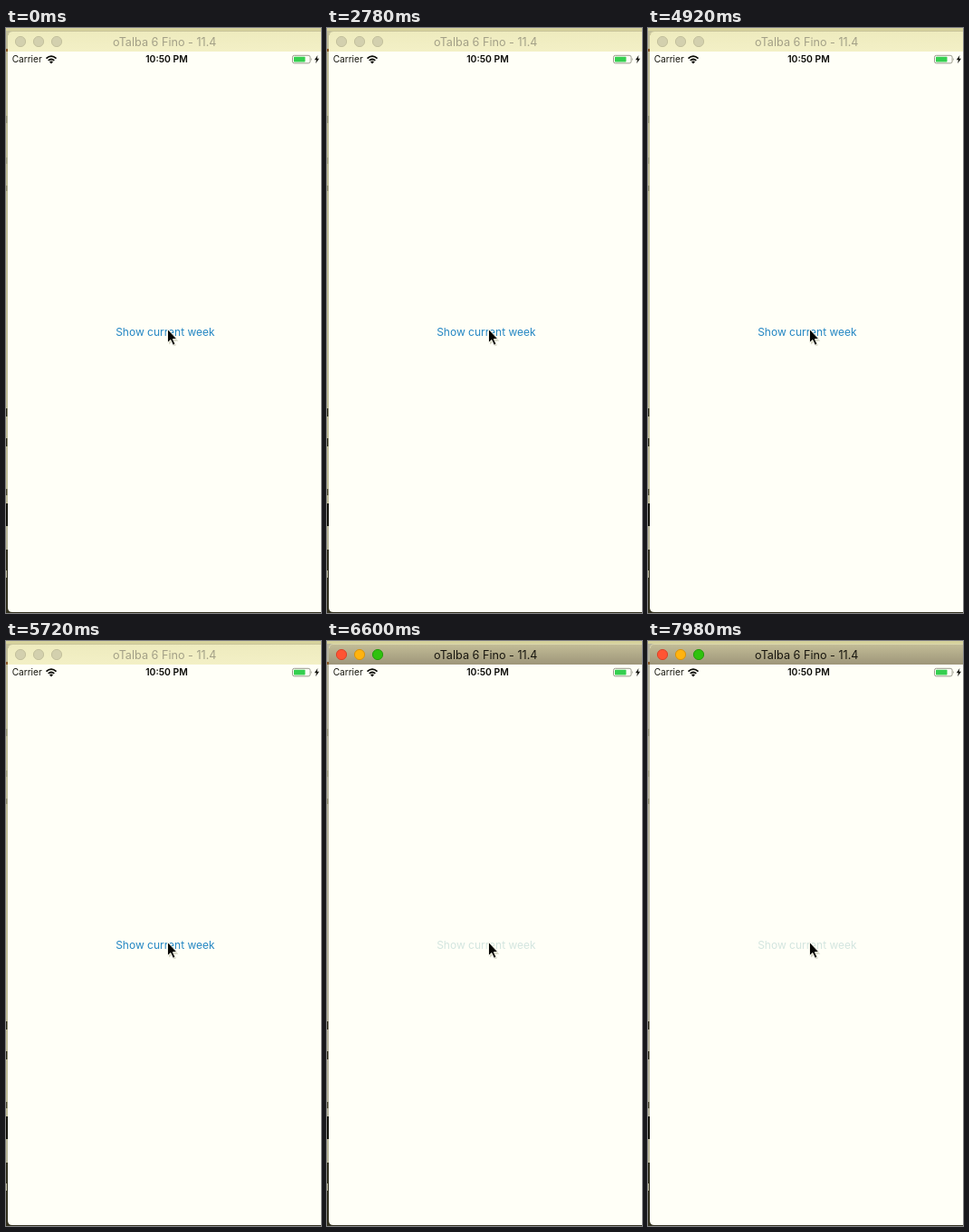
Recreate the animation shown at these times as an HTML page. Size 348 by 646 pixels, loop 8000 ms.

```html
<!DOCTYPE html>
<html lang="en">
<head>
<meta charset="utf-8">
<title>Show current week</title>
<style>
html, body { margin: 0; width: 100%; height: 100%; overflow: hidden; background: #fffff7; }
svg { display: block; width: 100vw; height: 100vh; }
text { font-family: Inter, Roboto, sans-serif; }
</style>
</head>
<body>
<svg viewBox="0 0 348 646" preserveAspectRatio="none">
  <defs>
    <linearGradient id="idle" x2="0" y2="1">
      <stop offset="0" stop-color="#eeebbe"/>
      <stop offset="1" stop-color="#f3f0c6"/>
    </linearGradient>
    <linearGradient id="active" x2="0" y2="1">
      <stop offset="0" stop-color="#c2bc96"/>
      <stop offset="1" stop-color="#9e967a"/>
    </linearGradient>
  </defs>

  <!-- desktop behind the window -->
  <rect id="desk" width="348" height="646"/>
  <rect width="348" height="3" fill="#d6d29c"/>
  <rect y="23" width="2" height="3" fill="#8a5a28"/>
  <g id="marks"></g>
  <rect y="525" width="4" height="25" fill="#15150c"/>
  <rect y="550" width="4" height="26" fill="#b9b79a"/>
  <rect y="576" width="348" height="70" fill="#33311f"/>
  <rect y="599" width="1" height="8" fill="#bdbb9d"/>

  <!-- window -->
  <path d="M2 25H348V645H7Q2 645 2 640Z" fill="#fffff7"/>
  <path id="bar" d="M2 26V8Q2 4 7 4H348V26Z"/>
  <path id="edge" d="M2.5 8Q2.5 3.5 7 3.5H348" fill="none"/>
  <g id="lights"></g>
  <text id="title" x="175.3" y="20" font-size="12.65" text-anchor="middle">oTalba 6 Fino - 11.4</text>

  <!-- status bar -->
  <text x="6.7" y="38.4" font-size="10.1" fill="#15150e">Carrier</text>
  <g fill="none" stroke="#0a0a06" stroke-width="1.8">
    <path d="M44.5 33.6Q50 28.6 55.5 33.6"/>
    <path d="M46.7 35.9Q50 33 53.3 35.9"/>
  </g>
  <path d="M47.9 37.3Q50 35.6 52.1 37.3L50 39.5Z" fill="#0a0a06"/>
  <text x="177.5" y="38.4" font-size="10.4" font-weight="600" text-anchor="middle" fill="#080805">10:50 PM</text>
  <rect x="316.5" y="30.3" width="19.6" height="8.6" rx="2" fill="none" stroke="#9a9a8d"/>
  <rect x="318" y="31.8" width="12.5" height="5.6" rx=".6" fill="#35cf50"/>
  <path d="M337.1 33Q338.7 34.6 337.1 36.2Z" fill="#9a9a8d"/>
  <path d="M344.4 30L340.8 35.2H343L342 39.3L346 33.8H343.6Z" fill="#0a0a06"/>

  <!-- button and pointer -->
  <text id="button" x="175.9" y="340" font-size="12" text-anchor="middle">Show current week</text>
  <path d="M180 335V349.5L183.2 346.8L185.4 351.3L188 350.2L186 345.8H190.3Z" fill="#77774f" opacity=".3"/>
  <path d="M178.5 332.5V347.6L181.9 344.5L184.5 350.3L187 349.2L184.4 343.6H188.9Z" fill="#050503" stroke="#fffff4" stroke-width=".9"/>
</svg>
<script>
const LOOP = 8000, PRESS = 5750;
const NS = "http://www.w3.org/2000/svg";
const $ = id => document.getElementById(id);

function add(parent, tag, attrs) {
  const el = parent.appendChild(document.createElementNS(NS, tag));
  for (const k in attrs) el.setAttribute(k, attrs[k]);
  return el;
}

const lights = [16, 36, 56].map(cx => add($("lights"), "circle", { cx, cy: 15, r: 5.6 }));
const colors = [["#ff5433", "#d9432a"], ["#ffb30f", "#d8920c"], ["#2fc20e", "#239b0c"]];

// bits of text cut off by the window's left edge
for (const [y, h, fill] of [[97, 8, "#96947a"], [143, 7, "#a3a184"], [174, 6, "#8f8d70"],
                            [420, 9, "#29281a"], [453, 9, "#29281a"], [509, 7, "#4a4833"]])
  add($("marks"), "rect", { y, width: 1.3, height: h, fill });

function draw(t) {
  const on = t >= PRESS;
  const set = (id, k, v) => $(id).setAttribute(k, v);
  set("desk", "fill", on ? "#b7b59f" : "#c1be9a");
  set("bar", "fill", on ? "url(#active)" : "url(#idle)");
  set("edge", "stroke", on ? "#dad6ad" : "#c9c59b");
  set("title", "fill", on ? "#17150e" : "#a3a087");
  set("button", "fill", on ? "#d3e5df" : "#2386c3");
  lights.forEach((el, i) => {
    const [fill, stroke] = on ? colors[i] : ["#d3d0ae", "#c3c09c"];
    el.setAttribute("fill", fill);
    el.setAttribute("stroke", stroke);
  });
}

function tick() {
  draw(performance.now() % LOOP);
  requestAnimationFrame(tick);
}
tick();
</script>
</body>
</html>
```
